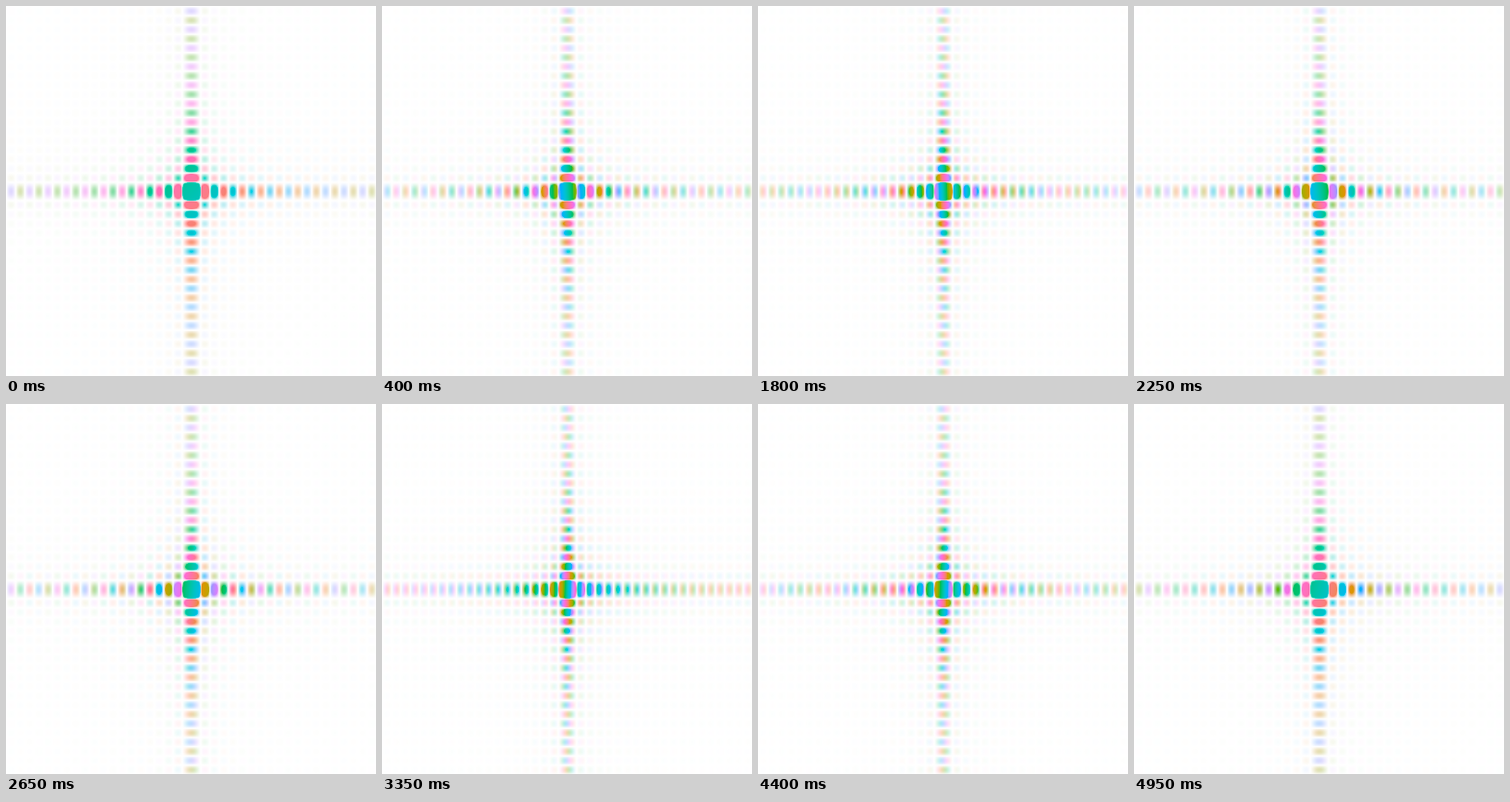
These frames come from a looping animation (384x384 px, 5 s). An HTML page with a canvas:

```html
<!DOCTYPE html>
<html lang="en">
<head>
<meta charset="utf-8">
<title>Spectrum of a moving square</title>
<style>
html, body { margin: 0; width: 100%; height: 100%; overflow: hidden; background: #fff; }
canvas { display: block; width: 384px; height: 384px; }
</style>
</head>
<body>
<canvas id="view" width="384" height="384"></canvas>
<script>
const N = 384, SIDE = 40, SWING = 20;
const LOOP = 5000, STEP = 50;
const FULL = 0.07;             // magnitude shown at full colour
const HUES = 512, LEVELS = 256;

const ctx = document.getElementById('view').getContext('2d');
const image = ctx.createImageData(N, N);
const pixels = new Uint32Array(image.data.buffer);

function gamma(v) {
  v = Math.min(1, Math.max(0, v));
  return Math.round(255 * (v <= 0.0031308 ? 12.92 * v : 1.055 * v ** (1 / 2.4) - 0.055));
}

// CIE LCh(uv) to a packed little-endian RGBA pixel
function lch(L, C, h) {
  const u = 0.19784 + C * Math.cos(h) / (13 * L);
  const v = 0.46834 + C * Math.sin(h) / (13 * L);
  const Y = ((L + 16) / 116) ** 3;
  const X = Y * 9 * u / (4 * v);
  const Z = Y * (12 - 3 * u - 20 * v) / (4 * v);
  const r = gamma(3.2406 * X - 1.5372 * Y - 0.4986 * Z);
  const g = gamma(-0.9689 * X + 1.8758 * Y + 0.0415 * Z);
  const b = gamma(0.0557 * X - 0.204 * Y + 1.057 * Z);
  return (255 << 24 | b << 16 | g << 8 | r) >>> 0;
}

const palette = new Uint32Array(HUES * LEVELS);
for (let i = 0; i < LEVELS; i++) {
  const s = i / (LEVELS - 1);
  for (let j = 0; j < HUES; j++) {
    palette[i * HUES + j] = lch(100 - 33 * s, 92 * s, 2 * Math.PI * j / HUES);
  }
}

// Transform of one side of the square, normalised to 1 at the middle
const side = Float64Array.from({ length: N }, (_, i) => {
  const a = Math.PI * (i - N / 2) / N;
  return a ? Math.sin(SIDE * a) / (SIDE * Math.sin(a)) : 1;
});

// Hue per position along one axis, for a square shifted by d
function hues(d) {
  return Float64Array.from(side, (m, i) =>
    HUES * (-(i - N / 2) * (d - 0.5) / N + (m < 0 ? 0.5 : 0)));
}

const rows = hues(0);

function draw(shift) {
  const cols = hues(shift);
  for (let y = 0, p = 0; y < N; y++) {
    const gain = Math.abs(side[y]) / FULL;
    const base = rows[y] + HUES / 2;
    for (let x = 0; x < N; x++, p++) {
      const s = Math.min(1, gain * Math.abs(side[x]));
      const level = Math.round(s * (LEVELS - 1));
      const hue = Math.round(base + cols[x]) & (HUES - 1);
      pixels[p] = palette[level * HUES + hue];
    }
  }
  ctx.putImageData(image, 0, 0);
}

let shown = null;
function tick() {
  const t = Math.floor(performance.now() % LOOP / STEP) * STEP;
  const shift = Math.round(SWING * Math.sin(2 * Math.PI * t / LOOP));
  if (shift !== shown) draw(shown = shift);
  requestAnimationFrame(tick);
}
tick();
</script>
</body>
</html>
```
